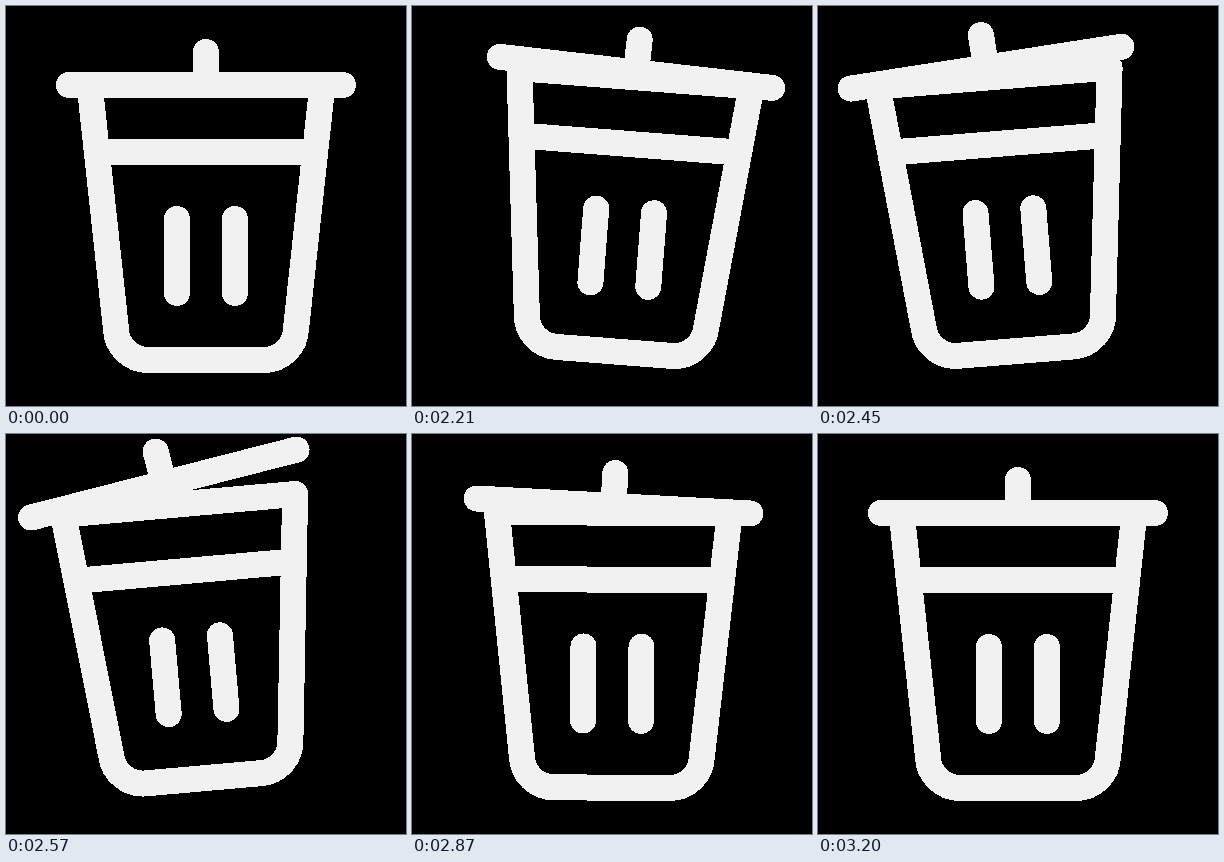
Animation, 400 px wide and 400 px high, one loop 3260 ms. Source, as an HTML page:

```html
<!DOCTYPE html>
<html lang="en">
<head>
<meta charset="utf-8">
<title>Trash bin</title>
<style>
  html, body { margin: 0; width: 100%; height: 100%; overflow: hidden; background: #000; }
  svg { display: block; width: 100vw; height: 100vh; }
  path {
    fill: none; stroke: #f1f1f1; stroke-width: 26;
    stroke-linecap: round; stroke-linejoin: round; shape-rendering: crispEdges;
  }
</style>
</head>
<body>
<svg viewBox="0 0 400 400">
  <g id="bin">
    <path d="M83.6 79 L110 323 A32 32 0 0 0 142 354 H258 A32 32 0 0 0 290 323 L316.4 79 Z"/>
    <path d="M91 146 H309 M171 213 V287 M229 213 V287"/>
    <path id="lid" d="M63 79 H337 M200 79 V46"/>
  </g>
</svg>
<script>
const LOOP = 3260, START = 2030, STEP = 30;

// Turning points of the two swings: time, angle
const rock = [[2020, 0], [2185, 4.6], [2520, -5.7], [2790, 1.8], [2995, -2.6], [3200, 0]];
const flap = [[2080, 0], [2290, 3], [2580, -9.3], [2810, 3], [3160, 0]];

const ease = (t, from, to) => {
  const u = Math.min(1, Math.max(0, (t - from) / (to - from)));
  return (1 - Math.cos(Math.PI * u)) / 2;
};
const arc = (t, from, to) => t > from && t < to ? Math.sin(Math.PI * (t - from) / (to - from)) : 0;

// Eased swing from one turning point to the next
const swing = (points, t) => points.slice(1).reduce(
  (angle, [time, next], i) => angle + (next - points[i][1]) * ease(t, points[i][0], time), 0);

const bin = document.getElementById('bin');
const lid = document.getElementById('lid');

function place(el, x, y, angle, px, py) {
  el.setAttribute('transform', `translate(${x} ${y}) rotate(${angle} ${px} ${py})`);
}

function pose(t) {
  // The bin tips on its bottom corners, then wobbles closer to its middle
  const tilt = swing(rock, t), loose = ease(t, 2570, 2750);
  const reach = 111 - 54 * loose;
  place(bin, 0, -9 * arc(t, 2570, 2850), tilt, 200 + Math.sign(tilt) * reach, 377 - 80 * loose);

  // The lid hinges on its lower end and is tossed up
  const open = swing(flap, t);
  place(lid, -12 * arc(t, 2360, 2860), -33 * arc(t, 2570, 2850), open, 200 + Math.sign(open) * 137, 79);
}

const origin = performance.now();
function draw() {
  const time = (performance.now() - origin) % LOOP;
  pose(time < START ? 0 : START + Math.floor((time - START) / STEP) * STEP);
  requestAnimationFrame(draw);
}
draw();
</script>
</body>
</html>
```
